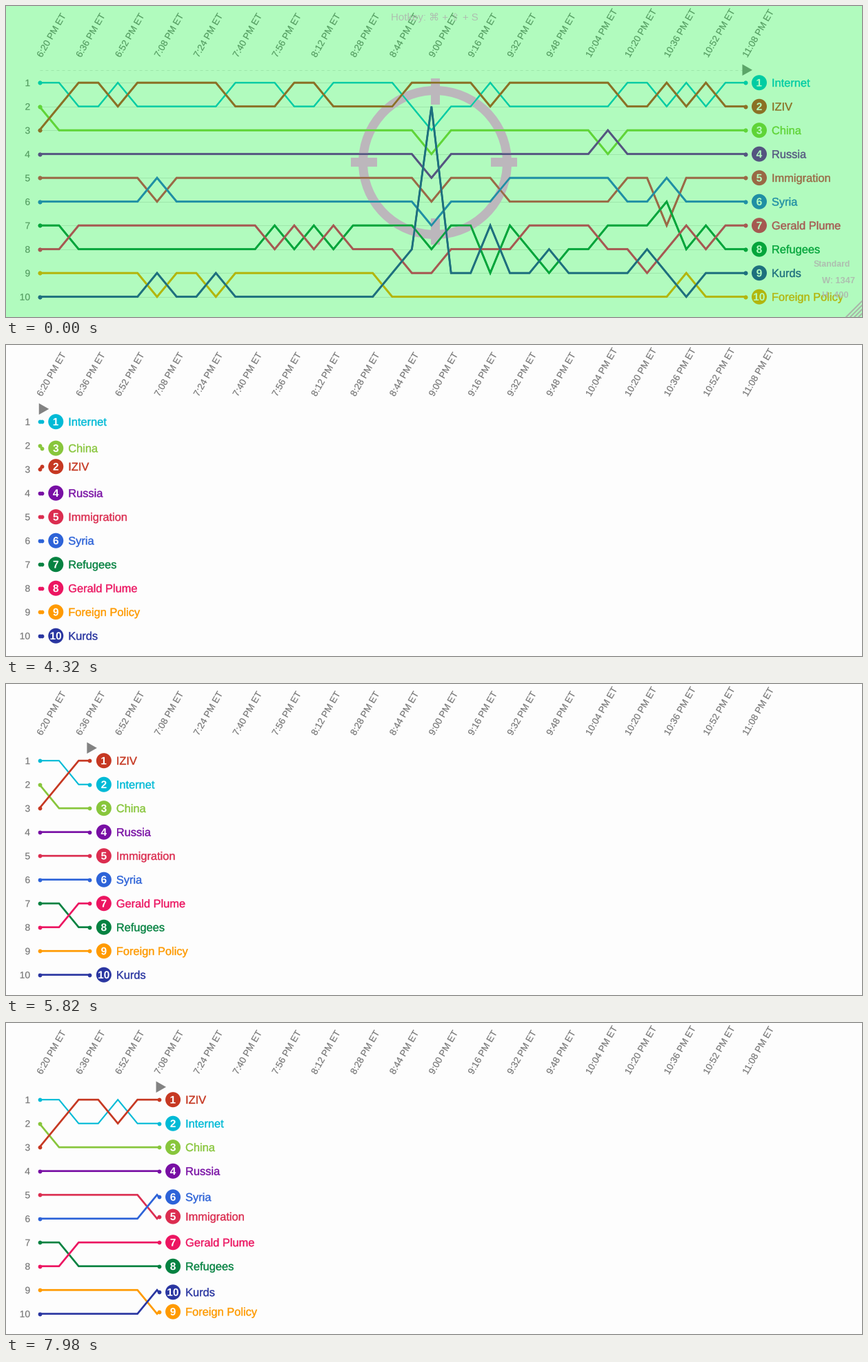
A matplotlib script for the animation above (8000 ms loop, 1241 by 451 pixels).

```python
import math

import matplotlib.pyplot as plt
import numpy as np
from matplotlib.animation import FuncAnimation
from matplotlib.colors import to_rgb
from matplotlib.patches import Circle, PathPatch, Polygon, Rectangle
from matplotlib.path import Path
from matplotlib.textpath import TextPath
from matplotlib.transforms import Affine2D

W, H, DPI = 1241, 451, 64
PX = 72 / DPI                      # one pixel in points
LOOP, TICK, STEP = 8000, 20, 60    # ms
FLASH_END, BLANK_START, BLANK_END, RUN_START = 60, 3180, 3420, 4250
SPEED = 0.0464                     # px per ms

X0, X1, SLOTS = 48.5, 1071.5, 36
DX = (X1 - X0) / SLOTS
Y0, DY = 111.2, 34.5
GREY = "#757575"

# Topics in their starting order.
TOPICS = [
    ("Internet", "#00bad6"),
    ("China", "#88c63c"),
    ("IZIV", "#c63822"),
    ("Russia", "#780fa4"),
    ("Immigration", "#db2d50"),
    ("Syria", "#2d63d8"),
    ("Refugees", "#058241"),
    ("Gerald Plume", "#ec1561"),
    ("Foreign Policy", "#ff9a00"),
    ("Kurds", "#2a36a1"),
]

# Time slot -> neighbouring ranks (n, n + 1) swapped one after another.
SWAPS = {
    1: [2], 2: [1, 7], 4: [1], 5: [1], 6: [5, 9], 7: [5, 9], 9: [9],
    10: [1, 9], 12: [7], 13: [1, 7], 14: [7], 15: [1, 7], 16: [7], 18: [9],
    19: [1, 8], 20: range(7, 1, -1), 21: range(2, 9),
    23: [1, 7, 8, 7], 24: [1, 5, 7, 8, 7], 25: [7], 26: [8], 27: [8],
    29: [3, 7], 30: [1, 3, 5], 31: [8], 32: [1, 5, 6, 8],
    33: [1, 6, 5, 7, 9], 34: [1, 7, 9], 35: [1, 7],
}


def build_ranks():
    order = list(range(len(TOPICS)))
    ranks = np.zeros((len(TOPICS), SLOTS + 1), int)
    for slot in range(SLOTS + 1):
        for n in SWAPS.get(slot, []):
            order[n - 1], order[n] = order[n], order[n - 1]
        ranks[order, slot] = np.arange(1, len(TOPICS) + 1)
    return ranks


def rank_y(rank):
    return Y0 + DY * (rank - 1)


def glyphs(text, size, weight="normal", align=0.0, middle=False):
    """Outline of a text, y up, moved so that `align` of its ink is at x = 0."""
    prop = {"family": "Liberation Sans", "weight": weight}
    path = TextPath((0, 0), text, size=size, prop=prop)
    box = path.get_extents()
    dx = -(box.x0 + align * box.width) if align else 0
    dy = -(box.y0 + box.height / 2) if middle else 0
    return path.transformed(Affine2D().translate(dx, dy))


def placed(path, x, y, angle=0):
    return path.transformed(
        Affine2D().rotate_deg(angle).scale(1, -1).translate(x, y))


def tint(color):
    return tuple(0.7 * np.array(to_rgb(color)) + 0.3 * np.array(VEIL))


VEIL = (0.01, 0.97, 0.18)
RANKS = build_ranks()
NUMBERS = [glyphs(str(n), 15.5, "bold", 0.5, True)
           for n in range(1, len(TOPICS) + 1)]

fig = plt.figure(figsize=(W / DPI, H / DPI), dpi=DPI, facecolor="#fdfdfd")
ax = fig.add_axes([0, 0, 1, 1])
ax.set(xlim=(0, W), ylim=(H, 0))
ax.axis("off")


def add_axis_labels():
    paths = []
    for n in range(1, len(TOPICS) + 1):
        paths.append(placed(glyphs(str(n), 13.8, align=1.0), 34.5, rank_y(n) + 5))
    for i in range(SLOTS // 2 + 1):
        minutes = 6 * 60 + 20 + 16 * i
        text = f"{minutes // 60}:{minutes % 60:02d} PM ET"
        paths.append(placed(glyphs(text, 13.45), 51.7 + 2 * DX * i, 75.5, 60))
    return ax.add_patch(PathPatch(Path.make_compound_path(*paths), fc=GREY,
                                  ec=GREY, lw=0.15 * PX, zorder=3))


class Row:
    """Line, badge and name of one topic."""

    def __init__(self, index, name, color):
        self.ranks = RANKS[index]
        self.ys = rank_y(self.ranks)
        width = 2.1 if name == "Internet" else 2.7
        self.line = self.add_line(color, width, 4)
        self.flash_line = self.add_line(tint(color), width, 52)
        z = 10 + index
        self.badge = ax.add_patch(Circle((0, 0), 11, fc=color, lw=0, zorder=z))
        self.number = ax.add_patch(
            PathPatch(NUMBERS[0], fc="white", lw=0, zorder=z + 0.2))
        self.name = ax.add_patch(
            PathPatch(glyphs(name, 16.4), fc=color, ec=color, lw=0.4 * PX,
                      zorder=z + 0.1))
        self.artists = [self.line, self.badge, self.number, self.name]

    @staticmethod
    def add_line(color, width, z):
        line, = ax.plot([], [], color=color, lw=width * PX, marker="o",
                        ms=5.8 * PX, mew=0, markevery=[0, -1], zorder=z,
                        solid_joinstyle="miter", snap=False)
        return line

    def update(self, pos):
        slots = np.append(np.arange(math.floor(pos) + 1), pos)
        ys = np.interp(slots, np.arange(SLOTS + 1), self.ys)
        self.line.set_data(X0 + DX * slots, ys)
        self.flash_line.set_data(X0 + DX * slots, ys)
        x, y = X0 + DX * pos, ys[-1]
        self.badge.center = (x + 20.5, y)
        self.number.set_path(NUMBERS[self.ranks[math.ceil(pos)] - 1])
        for patch, dx, dy in ((self.number, 20.5, 0), (self.name, 38.5, 5.8)):
            patch.set_transform(
                Affine2D().scale(1, -1).translate(x + dx, y + dy) + ax.transData)


def add_flash():
    """Green veil, sight, size notes and grid of the opening flash."""
    shade = "#bcb7bc"
    parts = [ax.add_patch(Rectangle((0, 0), W, H, fc=VEIL, alpha=0.3, lw=0,
                                    zorder=50))]
    for n in range(1, len(TOPICS) + 1):
        parts += ax.plot([X0, X1], [rank_y(n)] * 2, color="#e0e0e0", lw=PX, zorder=1)
    parts += ax.plot([X0, X1], [93, 93], color="#e0e0e0", lw=PX,
                     dashes=(4, 4), zorder=1)
    cx, cy = 622, 227
    parts.append(ax.add_patch(Circle((cx, cy), 104.5, fill=False, ec=shade,
                                     lw=13 * PX, zorder=51)))
    for dx, dy in ((-103, -1), (100, -1), (0, -103), (0, 100)):
        w, h = (38, 13) if dx else (13, 38)
        parts.append(ax.add_patch(Rectangle((cx + dx - w / 2, cy + dy - h / 2),
                                            w, h, fc=shade, lw=0, zorder=51)))
    notes = [(621, 15, "Hotkey: ⌘ + ⇧ + S", 15, "normal"),
             (1197, 374, "Standard", 12.3, "bold"),
             (1207, 397.5, "W: 1347", 12.8, "bold"),
             (1202, 418.5, "H: 400", 12.8, "bold")]
    for x, y, text, size, weight in notes:
        parts.append(ax.text(x, y, text, size=size * PX, weight=weight,
                             color="#aebfb0", ha="center", va="center_baseline",
                             family=["Liberation Sans", "DejaVu Sans"], zorder=53))
    for d in (23, 17, 11, 5):
        parts += ax.plot([W - d, W], [H, H - d], color="#a9b5a9", lw=2 * PX,
                         zorder=53)
    return parts


axis_labels = add_axis_labels()
arrow = ax.add_patch(Polygon([(0, 0)] * 3, fc="#828282", lw=0, zorder=5))
rows = [Row(i, *topic) for i, topic in enumerate(TOPICS)]
flash = add_flash() + [row.flash_line for row in rows]
chart = [axis_labels, arrow] + [a for row in rows for a in row.artists]


def position(t):
    if t < BLANK_START:
        return SLOTS
    return max(0, t - RUN_START) * SPEED / DX


def update(frame):
    t = frame * TICK // STEP * STEP
    shown = not BLANK_START <= t < BLANK_END
    for artist in chart:
        artist.set_visible(shown)
    for artist in flash:
        artist.set_visible(t < FLASH_END)
    pos = position(t)
    x = X0 + DX * pos
    arrow.set_xy([(x - 4, 84.5), (x + 10.5, 92.8), (x - 4, 101)])
    for row in rows:
        row.update(pos)
    return chart + flash


anim = FuncAnimation(fig, update, frames=LOOP // TICK, interval=TICK,
                     repeat=True, repeat_delay=0, cache_frame_data=False)
plt.show()
```
